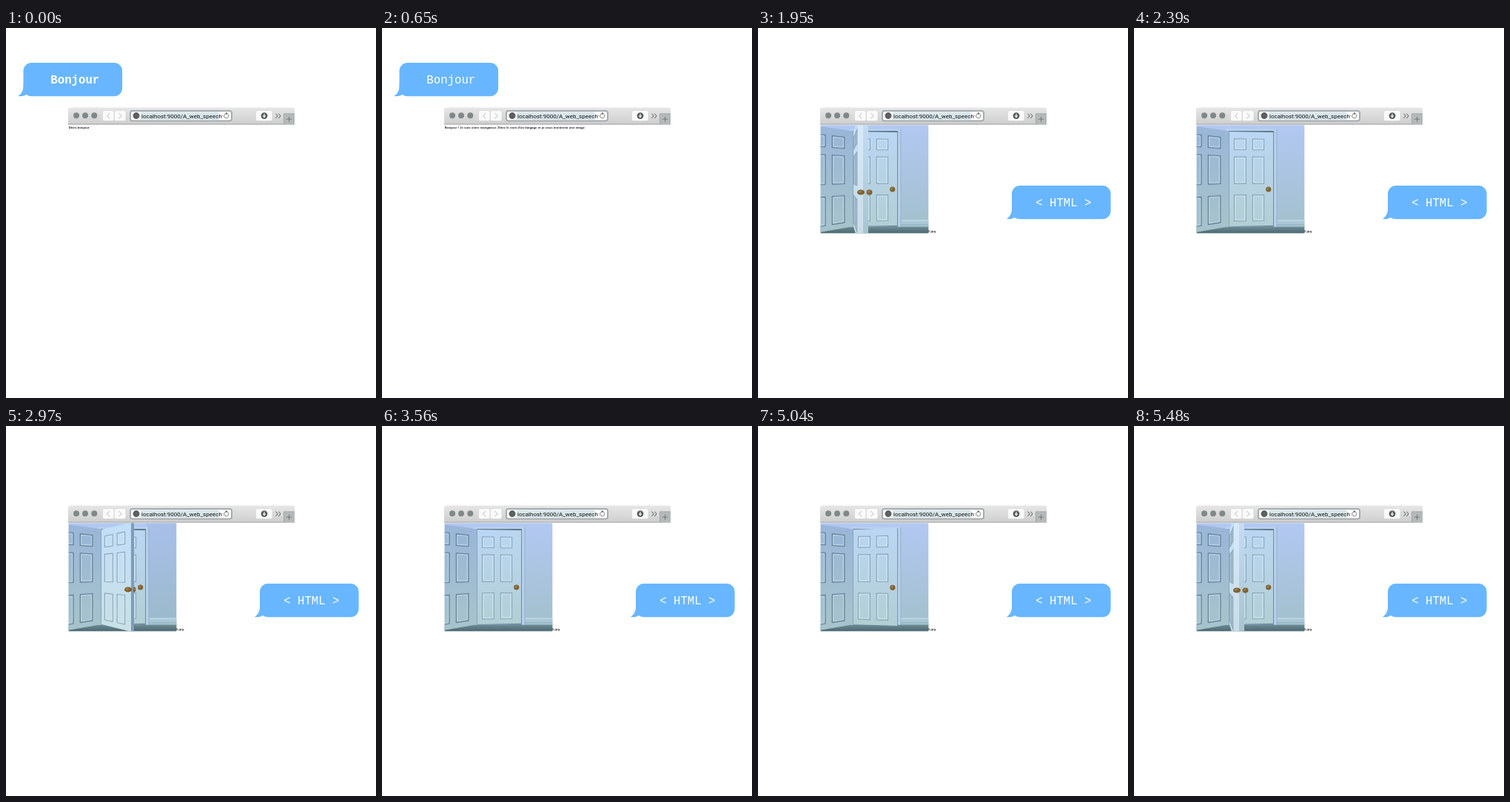
These frames come from a looping animation (500x500 px, 5.54 s). An HTML page with a canvas:

```html
<!DOCTYPE html>
<html lang="fr">
<head>
<meta charset="utf-8">
<title>Bonjour</title>
<style>
html, body { margin: 0; width: 100%; height: 100%; overflow: hidden; background: #fff; }
canvas { display: block; width: 500px; height: 500px; }
</style>
</head>
<body>
<canvas id="stage" width="500" height="500"></canvas>
<script>
const ctx = document.getElementById('stage').getContext('2d');
const LOOP = 5540, REPLY = 650, DOORS = 1650, STEP = 147.2;
const SANS = '"Liberation Sans", Arial, sans-serif';
const MONO = '"Liberation Mono", "Courier New", monospace';

function vertical(y0, y1, top, bottom) {
  const g = ctx.createLinearGradient(0, y0, 0, y1);
  g.addColorStop(0, top);
  g.addColorStop(1, bottom);
  return g;
}
function rect(x, y, w, h, fill) {
  ctx.fillStyle = fill;
  ctx.fillRect(x, y, w, h);
}
function rounded(x, y, w, h, r, fill, stroke, width = 1) {
  ctx.beginPath();
  ctx.roundRect(x, y, w, h, r);
  ctx.fillStyle = fill;
  ctx.fill();
  if (stroke) { ctx.strokeStyle = stroke; ctx.lineWidth = width; ctx.stroke(); }
}
function ellipse(x, y, rx, ry, fill) {
  ctx.beginPath();
  ctx.ellipse(x, y, rx, ry, 0, 0, 7);
  ctx.fillStyle = fill;
  ctx.fill();
}
function line(points, color, width = 1, closed = false) {
  ctx.beginPath();
  points.forEach(p => ctx.lineTo(p[0], p[1]));
  if (closed) ctx.closePath();
  ctx.strokeStyle = color;
  ctx.lineWidth = width;
  ctx.stroke();
}
function polygon(points, fill) {
  ctx.beginPath();
  points.forEach(p => ctx.lineTo(p[0], p[1]));
  ctx.fillStyle = fill;
  ctx.fill();
}
function text(string, x, y, font, color, align = 'left') {
  ctx.font = font;
  ctx.fillStyle = color;
  ctx.textAlign = align;
  ctx.fillText(string, x, y);
}

function bubble(x, y, label, weight) {
  ctx.save();
  ctx.translate(x, y);
  rounded(0, 0, 133.6, 45.3, 11, '#68b6ff');
  ctx.beginPath();
  ctx.moveTo(0, 28);
  ctx.quadraticCurveTo(1, 40, -7, 45);
  ctx.quadraticCurveTo(2, 46, 7, 41);
  ctx.lineTo(12, 34);
  ctx.fill();
  text(label, 69.8, 28, `${weight} 15.7px ${MONO}`, '#fff', 'center');
  ctx.restore();
}

function browser() {
  rounded(84, 107.5, 306, 23, [3, 3, 0, 0], vertical(108, 130, '#e6e6e6', '#cecece'));
  rect(84, 129.5, 306, 1, '#a8a8a8');
  for (const x of [95, 107, 119.3]) ellipse(x, 118.2, 4, 4, '#7f8989');
  for (const [x, dir] of [[130.5, -1], [146.5, 1]]) {
    rounded(x, 111.5, 15.5, 14, 2.5, '#fafafa', '#d2d2d2', .6);
    const mid = x + 7.8;
    line([[mid - dir * 1.8, 115], [mid + dir * 1.8, 118.6], [mid - dir * 1.8, 122.2]], '#b0b0b0', .9);
  }
  rounded(168, 112, 137, 13.5, 3, '#fff', '#a5acae', 2);
  rect(181.5, 113.5, 106, 10.5, '#d9e6ea');
  ellipse(176, 118.6, 4.5, 4.5, '#5c6061');
  text('localhost:9000/A_web_speech', 183, 121.7, '8px Roboto, sans-serif', '#111');
  ctx.beginPath();
  ctx.arc(297.7, 118.8, 3.1, -.9, 4.6);
  ctx.strokeStyle = '#6d7273';
  ctx.lineWidth = .9;
  ctx.stroke();
  polygon([[297, 113.8], [300, 115.7], [297, 117.3]], '#6d7273');
  rounded(337.5, 111.5, 22.5, 14, 2.5, '#fbfbfb', '#d2d2d2', .6);
  ellipse(349, 118.6, 4.4, 4.4, '#555b5c');
  rect(348.4, 115.8, 1.2, 3, '#fff');
  polygon([[346.6, 118.4], [351.4, 118.4], [349, 121.4]], '#fff');
  for (const x of [364.5, 368.3]) line([[x, 115.6], [x + 2.7, 118.8], [x, 122]], '#555b5c');
  rect(375, 115.5, 15, 14.5, '#b4b9b9');
  line([[375.5, 130], [375.5, 116], [390, 116]], '#9da3a3', .8);
  line([[379, 123.2], [386, 123.2]], '#6f7575', .9);
  line([[382.5, 119.7], [382.5, 126.7]], '#6f7575', .9);
}

// A panelled door from its hinge edge to its free edge, each { x, top, bottom }.
function door(hinge, free, [top, bottom], [dark, light]) {
  const at = (u, v) => {
    const mix = key => hinge[key] + (free[key] - hinge[key]) * u;
    return [mix('x'), mix('top') + (mix('bottom') - mix('top')) * v];
  };
  polygon([at(0, 0), at(1, 0), at(1, 1), at(0, 1)], vertical(140, 268, top, bottom));
  for (const [u0, u1] of [[.11, .38], [.53, .79]]) {
    for (const [v0, v1] of [[.075, .19], [.265, .55], [.67, .945]]) {
      const inset = (du, dv) =>
        [at(u0 + du, v0 + dv), at(u1 - du, v0 + dv), at(u1 - du, v1 - dv), at(u0 + du, v1 - dv)];
      line(inset(.025, .011), light, 1, true);
      line(inset(0, 0), dark, 1.1, true);
    }
  }
}
function knob(x, y, rx = 3.6) {
  ellipse(x, y, rx, 3.6, '#80602f');
  ellipse(x - rx * .2, y - .8, rx * .45, 1.5, '#a08048');
}

const edge = (x, top, bottom) => ({ x, top, bottom });
const HINGE = edge(129, 140, 268);
const PALE = ['#bad6f4', '#b2cfd4'], BRIGHT = ['#c2def8', '#c8e0e6'];
const LINES = ['#8ba6b8', '#d2e7f4'];
const SIDE_LINES = ['#5f7a92', '#c0d8e8'];
const NIGHT_LINES = ['#3c566d', '#7892ab'];

// Free edge of the door as it swings, by step: [x, top, bottom, edge thickness].
const SWING = {
  6: [188.5, 140, 268, 0], 7: [189, 138, 270, 1],
  0: [188.5, 136, 271.5, 1.5], 1: [173, 130, 278, 4], 2: [149, 122, 288, 14]
};

function sideDoor(hingeX, freeX, colors, lines) {
  rect(hingeX - 1, 139, 129 - hingeX, 129.5, vertical(140, 268, ...colors));
  door(edge(hingeX, 138.5, 269), edge(freeX, 130, 280), colors, lines);
}

function room(step) {
  ctx.save();
  ctx.beginPath();
  ctx.rect(84.7, 131.3, 145.6, 146);
  ctx.clip();
  rect(84, 131, 147, 147, vertical(131, 270, '#b2c8f2', '#a2c0cc'));
  if (step < 2) rect(190, 131, 41, 130, 'rgba(110,145,185,.14)');
  rect(191, 260, 40, 9, '#a9c7d5');
  rect(191, 259.5, 40, 1.2, '#c6dfeb');
  rect(191, 265.5, 40, 1, '#8cabb9');
  rect(84, 268.5, 147, 10, vertical(268, 278, '#6d8d97', '#4c6770'));

  // Door frame and the closed door.
  rect(124, 136.5, 69, 132, '#b9d2ee');
  rect(192.3, 137, 1, 131, '#94afc8');
  rect(128.5, 139, 60.5, 129.5, '#5d7688');
  door(HINGE, edge(188, 141, 267), PALE, LINES);
  rect(188.2, 140, 1, 128, '#7d97a9');
  knob(181.7, 218);

  // The door already standing open on the left.
  if (step === 3) {
    sideDoor(128.5, 84, ['#5c7a9c', '#48626c'], NIGHT_LINES);
    knob(90.5, 223, 6);
  } else if (step === 4) {
    sideDoor(126, 72, ['#7f9bbe', '#7894a0'], SIDE_LINES);
  } else {
    sideDoor(123.7, 62, ['#9ab6d8', '#a6c3cb'], SIDE_LINES);
  }

  if (SWING[step]) {
    const [x, top, bottom, thickness] = SWING[step];
    const face = x - thickness;
    door(HINGE, edge(face, top, bottom), step < 3 ? BRIGHT : PALE, LINES);
    const rim = step === 2 ? vertical(131, 277, '#c4dcf4', '#a9c4cf') : '#7f9db8';
    rect(face, top, thickness, bottom - top, rim);
    if (step === 1) {
      knob(165, 221, 5);
      knob(173.5, 221, 1.8);
    } else if (step === 2) {
      rect(135, 122, 7, 160, 'rgba(235,246,255,.5)');
      knob(139, 222, 5);
      knob(150.5, 222, 4);
    } else {
      knob(181.9, 218.3);
    }
  }
  ctx.restore();
  text('5.jpg', 230, 276.4, `bold 4.3px ${SANS}`, '#333');
}

function draw(now) {
  const t = now % LOOP;
  rect(0, 0, 500, 500, '#fff');
  browser();
  if (t < DOORS) {
    const replied = t >= REPLY;
    const message = replied
      ? "Bonjour ! Je suis votre navigateur. Dites le nom d'un langage et je vous montrerai une image"
      : 'Dites bonjour';
    bubble(23.5, 47, 'Bonjour', replied ? 400 : 700);
    text(message, 84.8, 135.6, `bold 4.3px ${SANS}`, '#222');
  } else {
    bubble(343, 213, '< HTML >', 400);
    room(Math.floor((t - DOORS + 8) / STEP) % 8);
  }
}

const start = performance.now();
function tick() {
  draw(performance.now() - start);
  requestAnimationFrame(tick);
}
tick();
</script>
</body>
</html>
```
